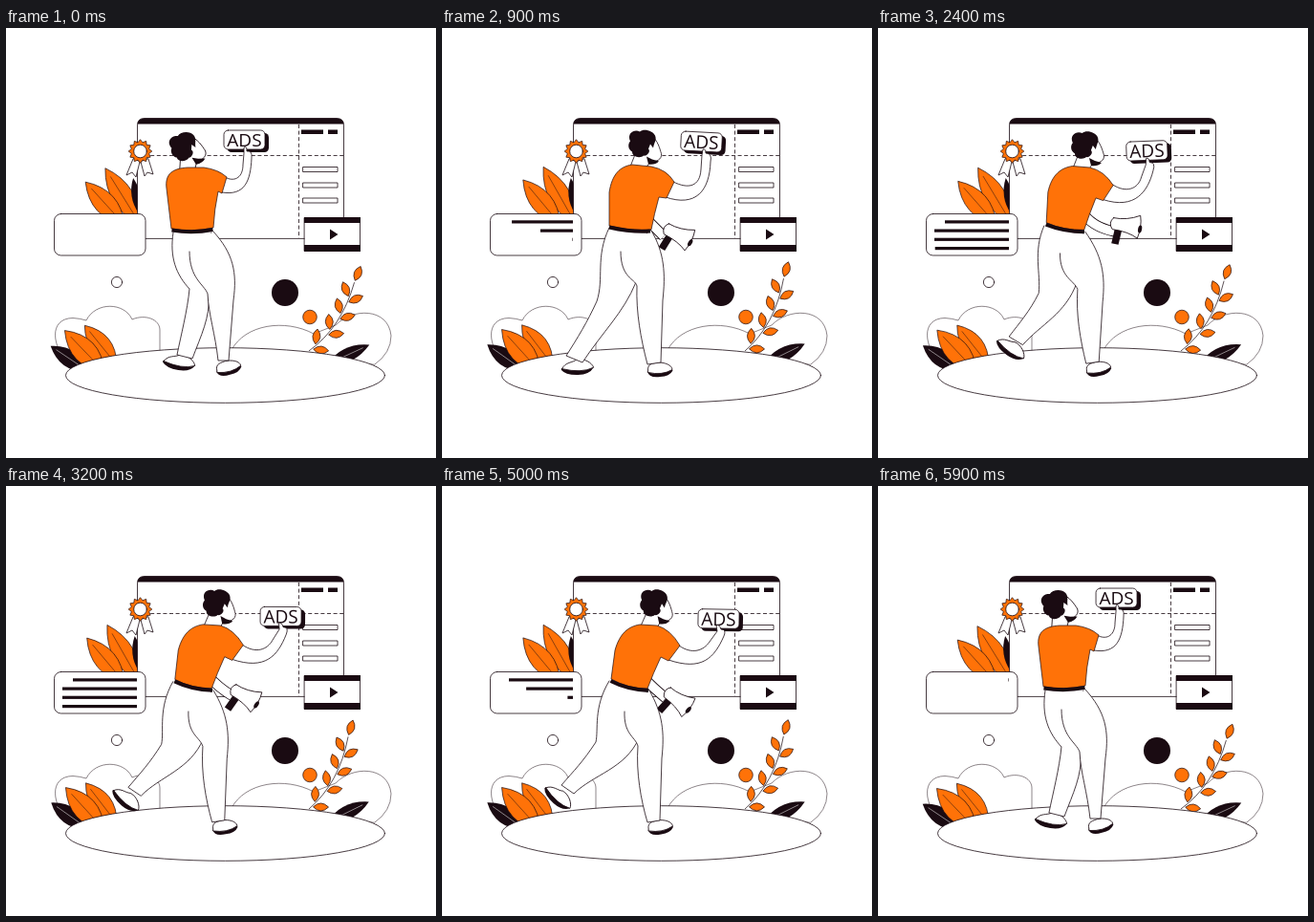
An HTML page that plays this animation: 450 px wide and 450 px high, repeating every 6000 ms.

```html
<!DOCTYPE html>
<html lang="en">
<head>
<meta charset="utf-8">
<title>Ads</title>
<style>
  html, body { margin: 0; width: 100%; height: 100%; overflow: hidden; background: #fff; }
  svg { display: block; width: 100vw; height: 100vh; }
  .o { fill: #fff; stroke: #1a0b12; stroke-width: .8; stroke-linejoin: round; stroke-linecap: round; }
  .n { fill: none; stroke: #1a0b12; stroke-width: .8; }
  .d { fill: #1a0b12; }
  .f { fill: #ff7208; stroke: #1a0b12; stroke-width: .7; stroke-linejoin: round; }
  .bush { stroke-width: .5; }
  text { font: 19px "Open Sans", "Noto Sans", sans-serif; text-anchor: middle; }
</style>
</head>
<body>
<svg viewBox="0 0 450 450">
  <g id="backLeaves"></g>

  <path class="o" d="M137.500 220V102Q137.500 94.500 145 94.500H346Q353.500 94.500 353.500 102V220Z"/>
  <path class="d" d="M137.500 100.500Q138 94.500 145 94.500H346Q353 94.500 353.500 100.500Z"/>
  <path class="n" stroke-dasharray="4 2.6" d="M138 133.500H353M306.500 101V220"/>
  <path class="d" d="M309 106.500h23v4.500h-23zM337 106.500h10v4.500h-10z"/>
  <path class="o" d="M311 145.500h36v5h-36zM311 162h36v5h-36zM311 178h36v5h-36z"/>
  <path class="o" d="M312.500 198.500h58v35h-58z"/>
  <path class="d" d="M312 198h59v6h-59zM312 227h59v7h-59zM339 210.500L347.500 216L339 221.500z"/>

  <path class="o" d="M133 137L126 154L132 151L136 156L140 140ZM141 140L145 155L148 151L154 153L149 137Z"/>
  <path class="f" id="rosette"/>
  <circle class="o" cx="140.500" cy="129" r="6.800"/>

  <rect class="o" x="50.500" y="194.500" width="95.500" height="43.500" rx="7"/>
  <g id="lines" class="d"></g>

  <circle class="o" cx="116" cy="266" r="5.600"/>
  <circle class="d" cx="292" cy="277" r="14"/>

  <path class="o bush" d="M66 352C48 334 44 304 70 303.500Q78 304 84 306C94 286 124 287 132 305C146 299 161 305 161 316V345Z"/>
  <path class="o bush" d="M236 337C250 310 292 304 322 320L345 311C362 293 400 292 403 322Q403 340 386 352Z"/>
  <circle class="f" cx="318" cy="302.500" r="7.300"/>
  <g id="branch"></g>
  <g id="rightLeaf"></g>
  <g id="groundLeaves"></g>
  <ellipse class="o" cx="229.500" cy="363.500" rx="167" ry="28.800"/>

  <path id="farArmEdge" fill="none" stroke="#1a0b12" stroke-width="11"/>
  <path id="farArm" fill="none" stroke="#fff" stroke-width="9.400"/>
  <g id="horn">
    <path class="d" d="M-6.500 4H1L.5 20.500H-7Z"/>
    <path class="o" d="M-10 -6Q4 -6 17 -14Q21 -3 18.500 10Q8 5 -9 6Q-15 0 -10 -6Z"/>
    <ellipse class="d" cx="19.300" cy="0" rx="2" ry="4"/>
  </g>

  <g id="backShoe"><path class="d" d="M-17 1C-15 -6 14 -5 17 2Q12 9 0 8Q-13 7 -17 1Z"/>
    <path class="o" d="M-16 0C-12 -7 -4 -5 0 -8C8 -9 16 -3 17 2Q4 7 -16 0Z"/></g>
  <path class="o" id="backLeg"/>
  <g id="frontShoe"><path class="d" d="M-13 1C-12 -5 11 -5 13.500 1Q10 7 0 7Q-12 8 -13 1Z"/>
    <path class="o" d="M-12.500 0C-13 -8 -6 -7 -2 -8C5 -8 13 -5 13 0Q2 6 -12.500 2Z"/></g>
  <path class="o" id="frontLeg"/>

  <g id="button">
    <rect class="d" x="-18" y="-7.500" width="43.500" height="20" rx="4.500"/>
    <rect class="o" x="-21.500" y="-10.500" width="43" height="20" rx="4.500"/>
    <text class="d" y="6.500">ADS</text>
  </g>

  <g id="head">
    <path class="o" d="M9 -10C16 -5 18 4 19.500 9C20.500 15 14 18 8 17L3 25H-14L-8 10Z"/>
    <path class="d" d="M4 12L10 15L17 17Q13 21 6 20Z"/>
    <path class="d" d="M-13 -4C-17 -13 -8 -17 -3 -14C1 -18 11 -15 13 -10C15 -5 12 -3 11 3L8 -1L6 4C9 7 4 12 1 11C-2 14 -11 13 -11 7C-15 5 -16 -1 -13 -4Z"/>
  </g>
  <path class="o" id="arm"/>
  <path class="f" id="shirt"/>
  <path class="n" id="belt" style="stroke-width:4"/>
</svg>
<script>
const LOOP = 6000;
const $ = id => document.getElementById(id);

function add(parent, tag, attrs) {
  const el = document.createElementNS("http://www.w3.org/2000/svg", tag);
  for (const k in attrs) el.setAttribute(k, attrs[k]);
  return $(parent).appendChild(el);
}

// Pointed leaf from base to tip, with an optional midrib
function leaf(parent, x1, y1, x2, y2, w, cls = "f", rib = true) {
  const len = Math.hypot(x2 - x1, y2 - y1);
  const nx = (y1 - y2) / len * w, ny = (x2 - x1) / len * w;
  const mx = (x1 + x2) / 2, my = (y1 + y2) / 2;
  add(parent, "path", { class: cls,
    d: `M${x1} ${y1}Q${mx + nx} ${my + ny} ${x2} ${y2}Q${mx - nx} ${my - ny} ${x1} ${y1}` });
  if (rib) add(parent, "path", { d: `M${x1} ${y1}L${x2 + (x1 - x2) * .15} ${y2 + (y1 - y2) * .15}`,
    stroke: cls === "d" ? "#fff" : "#1a0b12", "stroke-width": .5 });
}

leaf("backLeaves", 140, 205, 105, 146, 22);
leaf("backLeaves", 124, 206, 84, 160, 22);
leaf("backLeaves", 139, 194, 134, 157, 9, "d", false);
leaf("rightLeaf", 336, 352, 380, 331, 14, "d");
leaf("groundLeaves", 86, 359, 47, 332, 18, "d");
leaf("groundLeaves", 116, 353, 83, 311, 21);
leaf("groundLeaves", 103, 360, 62, 316, 24);

// Branch: staggered leaves along a quadratic stem
const BASE = [317, 338], BEND = [350, 312], TOP = [361, 264];
add("branch", "path", { d: `M${BASE}Q${BEND} ${TOP}`, fill: "none", stroke: "#1a0b12", "stroke-width": .7 });

function sprig(s, side) {
  const at = i => (1 - s) ** 2 * BASE[i] + 2 * s * (1 - s) * BEND[i] + s * s * TOP[i];
  const slope = i => (1 - s) * (BEND[i] - BASE[i]) + s * (TOP[i] - BEND[i]);
  const a = Math.atan2(slope(1), slope(0)) + side;
  const c = Math.cos(a), d = Math.sin(a);
  leaf("branch", at(0) + 2 * c, at(1) + 2 * d, at(0) + 18 * c, at(1) + 18 * d, 8, "f", false);
}
for (const s of [.1, .36, .6, .82]) {
  sprig(s, -.75);
  sprig(s - .06, .75);
}
sprig(1, .1);

$("rosette").setAttribute("d", "M" + Array.from({ length: 24 }, (_, i) => {
  const r = i % 2 ? 9.5 : 12.3, a = i * Math.PI / 12;
  return [140.5 + r * Math.cos(a), 129 + r * Math.sin(a)];
}).join("L") + "Z");

// Text lines: full width, top, start, duration
const lines = [[67, 201.3, 100, 920], [78, 210.5, 370, 1160], [78, 219.7, 838, 1287], [78, 229, 1405, 1055]]
  .map(([w, y, start, dur]) => ({ w, start, dur, el: add("lines", "rect", { y, height: 3.2 }) }));

// Poses: A stand, G stride, M reach, E lean, N upright reach
const parts = {
  shirt: {
    A: "M190 146C175 147 166 152 168 168L173 210Q195 214 217 209Q218 190 222 171L226 173L231 156Q222 148 207 146Z",
    G: "M199 143C186 145 178 153 175 172L175 207Q199 213 219 211Q222 195 227 177L235 178L243 161Q235 148 219 145Z",
    M: "M203 144C190 146 181 154 177 172L176 204Q195 212 216 211Q221 196 228 178L236 180L246 164Q237 149 221 146Z",
    E: "M207 145C195 147 186 154 181 172L177 202Q194 212 215 212Q221 196 229 179L237 183L249 167Q239 150 225 146Z" },
  belt: {
    A: "M173.500 211.500Q195 215 216.500 211", G: "M175 208.500Q199 214 218 212.500",
    M: "M175.500 206Q195 213 216 213", E: "M176.500 204Q194 213 216 214" },
  arm: {
    A: "M231 157C240 161 248 156 248 143L249 131L249 125Q252 123 252 129Q258 128 257 136C256 160 250 176 226 172",
    G: "M242 161C258 169 270 166 271 148L272 133L273 127Q276 126 276 131Q283 131 281 140C280 170 266 188 234 177",
    M: "M246 163C260 172 274 168 276 153L279 139L280 132Q283 131 283 136Q290 136 287 146C284 166 270 190 236 179",
    E: "M248 167C262 177 274 172 280 163L288 152L287 146Q290 144 292 150Q298 150 295 157C285 180 272 194 237 182" },
  backLeg: {
    A: "M175 214C171 240 178 258 192 273C190 295 183 322 179 342L195 346C204 322 214 302 212 280L215 214",
    G: "M175 209C160 240 170 262 162 286C152 308 142 324 130 343L147 350C168 318 190 298 203 266L215 213",
    M: "M173 208C163 235 174 258 170 284C162 302 150 314 140 327L155 336C174 314 198 300 209 266L215 214",
    E: "M175 204C158 232 164 255 161 268C148 288 138 298 125 313L138 322C158 302 192 296 206 264L215 214" },
  frontLeg: {
    A: "M217 213C238 236 242 256 238 285L233 348L222 348C219 320 212 300 211 278C207 268 192 262 192 234",
    G: "M219 212C233 235 234 258 231 285L229 350L215 352C208 325 203 298 204 270C202 262 187 262 187 234",
    M: "M217 213C236 238 241 258 238 288L233 349L219 351C213 325 209 300 211 274C207 264 190 262 190 236",
    E: "M217 214C231 238 233 258 230 285L228 350L215 352C208 328 203 300 205 272C202 262 190 260 191 236" },
  farArm: {
    A: "M200 185Q198 200 198 215", G: "M210 196Q220 206 232 218", M: "M218 190Q224 208 252 212",
    N: "M216 188Q224 206 255 208", E: "M210 200Q222 212 234 222" },
  horn: {
    A: "translate(200 228) rotate(55)", G: "translate(243 215) rotate(30)", M: "translate(259 203) rotate(-3)",
    N: "translate(262 198) rotate(-4)", E: "translate(243 222) rotate(40)" },
  button: {
    A: "translate(249.500 117.500) rotate(0)", G: "translate(271.500 119.500) rotate(3)", M: "translate(279 125) rotate(1)",
    N: "translate(277 123) rotate(-4)", E: "translate(289.500 139.500) rotate(1)" },
  head: {
    A: "translate(187 125.500) rotate(-18)", G: "translate(210 122.500) rotate(0)",
    M: "translate(217 124) rotate(0)", E: "translate(222 124) rotate(2)" },
  backShoe: {
    A: "translate(181 350) rotate(5)", G: "translate(141.500 355) rotate(-6)",
    M: "translate(145 340) rotate(30)", E: "translate(121.500 325.500) rotate(37)" },
  frontShoe: {
    A: "translate(233 356) rotate(-12)", G: "translate(228 358) rotate(-2)",
    M: "translate(232 357) rotate(-10)", E: "translate(228.500 357.500) rotate(-7)" }
};

const NUM = /-?\d+(\.\d+)?/g;

// Blend two strings that differ only in their numbers
function mix(a, b, k) {
  const to = b.match(NUM);
  let i = 0;
  return a.replace(NUM, v => (+v + (to[i++] - v) * k).toFixed(2));
}

for (const p of Object.values(parts)) p.N ??= mix(p.M, p.A, .1);

const keys = [[0, "A"], [900, "G"], [1700, "M"], [2050, "N"], [2920, "E"], [4050, "N"], [5000, "E"], [5920, "A"], [LOOP, "A"]];

const smooth = x => {
  x = Math.min(1, Math.max(0, x));
  return x * x * (3 - 2 * x);
};

function draw(t) {
  const i = keys.findIndex(k => k[0] > t);
  const [t0, from] = keys[i - 1], [t1, to] = keys[i];
  const k = smooth((t - t0) / (t1 - t0));
  for (const id in parts) {
    const value = mix(parts[id][from], parts[id][to], k);
    $(id).setAttribute(value[0] === "M" ? "d" : "transform", value);
  }
  $("farArmEdge").setAttribute("d", $("farArm").getAttribute("d"));

  const sway = Math.cos(t * Math.PI / 1000);
  const turn = (id, deg, x, y) => $(id).setAttribute("transform", `rotate(${deg * sway} ${x} ${y})`);
  turn("branch", 2.8, 318, 338);
  turn("backLeaves", -1.2, 138, 200);
  turn("groundLeaves", -.8, 100, 356);
  turn("rightLeaf", .8, 336, 352);

  const u = Math.min(t, 6050 - t);
  for (const { el, w, start, dur } of lines) {
    const width = w * smooth((u - start) / dur);
    el.setAttribute("x", 137 - width);
    el.setAttribute("width", width);
  }
}

function tick() {
  draw(performance.now() % LOOP);
  requestAnimationFrame(tick);
}
tick();
</script>
</body>
</html>
```
